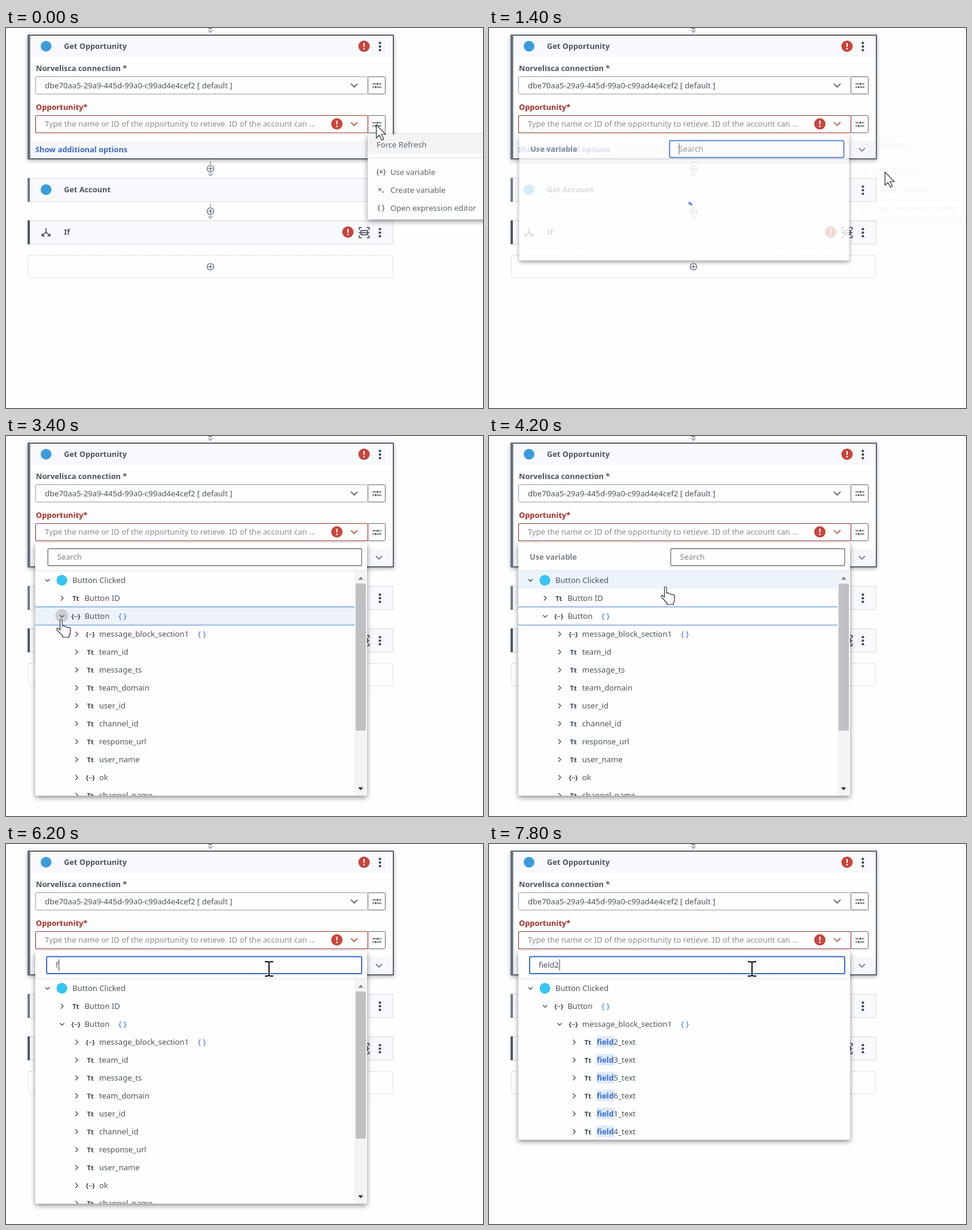
Animation of 798x636 px, one loop 8000 ms. Source, as an HTML page:

```html
<!DOCTYPE html>
<html lang="en">
<head>
<meta charset="utf-8">
<title>Workflow variable picker</title>
<style>
html, body { margin: 0; width: 100%; height: 100%; overflow: hidden; background: #fefefe; }
svg { display: block; width: 798px; height: 636px; font: 13.05px "Noto Sans", "Open Sans", sans-serif; white-space: pre; }
.card { filter: drop-shadow(0 2px 3px rgba(40, 50, 60, .4)); }
.float { filter: drop-shadow(0 3px 4px rgba(0, 0, 0, .45)); }
</style>
</head>
<body>
<svg id="stage" viewBox="0 0 798 636"></svg>
<script>
const INK = '#4a555f', DARK = '#36424c', RED = '#c8453d', BLUE = '#3a6cd4';
const LOOP = 8000, STEP = 200;
const stage = document.getElementById('stage');
const pen = document.createElement('canvas').getContext('2d');

// y is the visual centre of the line
const text = (x, y, s, fill = INK, extra = '') =>
  `<text x="${x}" y="${y + 4.6}" fill="${fill}" ${extra}>${s}</text>`;
const bold = (x, y, s, fill = INK) => text(x, y, s, fill, 'font-weight="600" font-size="12.8"');
const glyph = (x, y, s, size = 11, weight = 600) =>
  text(x, y - .5, s, DARK, `text-anchor="middle" font-weight="${weight}" font-size="${size}"`);
const rect = (x, y, w, h, fill, extra = '') =>
  `<rect x="${x}" y="${y}" width="${w}" height="${h}" fill="${fill}" ${extra}/>`;
const box = (x, y, w, h, stroke, width = 1) =>
  rect(x, y, w, h, '#fefefe', `rx="2" stroke="${stroke}" stroke-width="${width}"`);
const circle = (x, y, r, fill, extra = '') =>
  `<circle cx="${x}" cy="${y}" r="${r}" fill="${fill}" ${extra}/>`;
const line = (d, stroke = INK, width = 1.5) =>
  `<path d="${d}" fill="none" stroke="${stroke}" stroke-width="${width}"/>`;
const group = (body, extra) => `<g ${extra}>${body}</g>`;

const error = (x, y) => circle(x, y, 9.5, RED) +
  line(`M${x} ${y - 5.5}v6.5M${x} ${y + 3}v2.4`, '#fff', 2.2);
const kebab = y => [-6, 0, 6].map(d => circle(625.5, y + d, 2.1, DARK)).join('');
const down = (x, y, r = 5.5, stroke = INK, w = 1.7) =>
  line(`M${x - r} ${y - r / 2}l${r} ${r}l${r} ${-r}`, stroke, w);
const plus = y => circle(342, y, 5.5, 'none', `stroke="${INK}" stroke-width="1.2"`) +
  line(`M338.5 ${y}h7M342 ${y - 3.5}v7`, INK, 1.2);
const connector = y => line(`M342 ${y - 13}v7M342 ${y + 6}v5M338 ${y + 8}l4 4l4 -4`, '#9aa2a8', 1.3) + plus(y);
const settings = y => box(605.5, y - 14.5, 29, 29, '#5d6871') +
  line(`M613 ${y - 2.5}h6M624 ${y - 2.5}h4M613 ${y + 3}h3M621 ${y + 3}h7`, INK, 1.3) +
  circle(621.5, y - 2.5, 1.7, INK) + circle(618.5, y + 3, 1.7, INK);
const step = (y, name, bar) => rect(36.5, y + .5, 611, 39, '#f8f9fc', 'stroke="#d9dce1"') +
  rect(36, y, 4, 40, bar) + bold(97, y + 19.5, name);

const backdrop =
  connector(-4.5) + connector(235.5) + connector(306.5) +
  group(rect(37, 12, 611, 207, '#fefefe', 'stroke="#5a6670" stroke-width="2"'), 'class="card"') +
  rect(40, 13, 607, 36, '#f8f9fc') + rect(40, 188, 607, 30, '#f6f7fc') + rect(36, 11, 4.5, 209, '#65707a') +
  circle(67, 30.5, 9, '#3b9ddd') + bold(97, 30.5, 'Get Opportunity') + error(599, 30.5) + kebab(31) +
  bold(50, 67.5, 'Norvelisca connection *') +
  box(49.5, 81.5, 556, 29, '#98a0a7') + settings(96) + down(582.5, 96) +
  text(65, 96.5, 'dbe70aa5-29a9-445d-99a0-c99ad4e4cef2 [ default ]') +
  bold(50, 132.5, 'Opportunity*', '#a52c26') +
  settings(161) + box(49.5, 146.5, 556, 29, '#a13a34', 1.2) +
  text(65, 160.5, 'Type the name or ID of the opportunity to retieve. ID of the account can ...', '#858c92') +
  error(553.5, 160.5) + down(582.5, 160.5, 5.5, RED) +
  bold(49, 203.5, 'Show additional options', '#3c68c8') + down(624, 203.5, 5, INK, 1.3) +
  step(251, 'Get Account', '#727d86') + circle(67, 270.5, 9, '#3b9ddd') + kebab(271.5) +
  step(322, 'If', '#505b64') +
  line('M67 335v6.5l-6 6M67 341.5l6 6M60.5 344v4h4M73.5 344v4h-4', DARK, 1.6) + error(572, 341.5) + kebab(342.5) +
  line('M591 338v-4h4M603 334h4.5v4M607.5 347v4h-4M595 351h-4v-4M594 339h11v7h-11zM590 342.5h18', DARK, 1.5) +
  rect(37.5, 380.5, 609, 38, 'none', 'rx="3" stroke="#cfd3d7" stroke-dasharray="3 2"') + plus(399.5);

const menu =
  group(rect(605, 178, 200, 142.5, '#fefefe'), 'class="float"') +
  rect(605, 179, 193, 32, '#f2f4f5') + rect(605, 217, 193, 1, '#d8dbde') +
  text(620, 195.5, 'Force Refresh', '#59646d') +
  [['{×}', 'Use variable'], ['×₊', 'Create variable'], ['{ }', 'Open expression editor']]
    .map(([icon, label], i) => glyph(627.5, 241 + 30 * i, icon, 12, 400) + text(643, 241.5 + 30 * i, label, '#59646d')).join('');

// Tree rows: [level, icon, label, open]
const OBJ = '{··}', STR = 'Tt';
const root = [0, '', 'Button Clicked', true];
const closedRows = [root, [1, STR, 'Button ID'], [1, OBJ, 'Button']];
const openRows = [root, closedRows[1], [1, OBJ, 'Button', true], [2, OBJ, 'message_block_section1'],
  ...'team_id message_ts team_domain user_id channel_id response_url user_name'.split(' ').map(s => [2, STR, s]),
  [2, OBJ, 'ok'], [2, STR, 'channel_name']];
const foundRows = [root, [1, OBJ, 'Button', true], [2, OBJ, 'message_block_section1', true],
  ...[2, 3, 5, 6, 1, 4].map(n => [3, STR, `field${n}_text`])];

function treeRow([level, icon, label, open], i) {
  const y = 241.5 + 30 * i, x = 69.5 + 24.3 * level;
  const tag = /^(Button|message_block_section1)$/.test(label) ? `<tspan dx="15" fill="${BLUE}">{ }</tspan>` : '';
  const hit = level == 3;
  return (open ? down(x, y, 3.6, INK, 1.4) : line(`M${x - 2} ${y - 4}l4 4l-4 4`, INK, 1.4)) +
    (icon ? glyph(x + 23, y, icon) : circle(93.5, y, 9, '#36c5f0')) +
    (hit ? rect(180, y - 10, 29.5, 19, '#dce9fb') : '') +
    text(level ? 107 + 24.4 * level : 111, y,
      (hit ? `<tspan font-weight="600" font-size="12.8" fill="${BLUE}">field</tspan>${label.slice(5)}` : label) + tag);
}

const scrollbar = rect(583, 226, 20, 376, '#f3f4f6') + rect(585, 247, 17, 246, '#c0c0c4') +
  '<path d="M589 240.5h9l-4.5 -5z" fill="#888"/><path d="M589 588h8.5l-4.2 5z" fill="#333"/>';

// Piecewise linear keys: [time, value, value...]
function at(keys, t) {
  const i = keys.findIndex(k => k[0] > t);
  if (i < 0) return keys[keys.length - 1].slice(1);
  if (!i) return keys[0].slice(1);
  const a = keys[i - 1], b = keys[i], p = (t - a[0]) / (b[0] - a[0]);
  return a.slice(1).map((v, j) => v + (b[j + 1] - v) * p);
}
const pointerPath = [[0, 619, 162], [800, 662, 241], [1400, 662, 241], [2200, 130, 316], [2600, 119, 307],
  [3000, 92, 307], [3400, 92, 307], [3800, 150, 295], [4600, 440, 209]];
const searchOpen = [[1400, 0], [1600, .57], [1800, 1], [3400, 1], [3600, .43], [3800, 0], [4800, 0], [5000, .57], [5200, 1]];

function search(t) {
  const [open] = at(searchOpen, t);
  const focused = t < 3200 || t >= 4800;
  const left = 302 - 234 * open + (focused ? 0 : 2);
  const typed = t >= 7800 ? 'field2' : 'field'.slice(0, Math.max(0, (t - 6000) / STEP));
  pen.font = getComputedStyle(stage).font;
  const caret = left + 15.5 + pen.measureText(typed).width;
  const blink = t >= 5600 && t < 6000;
  return group(bold(68, 202.5, 'Use variable', '#78828a'), `opacity="${1 - open}"`) +
    box(left, 188.5, 595 - left, 28.5, focused ? BLUE : '#66717a', focused ? 2 : 1.3) +
    text(left + (typed ? 15 : 15.5), 202.5, typed || 'Search', typed ? INK : '#7c848b') +
    (focused && !blink ? rect(caret, 193, 1, 19, DARK) : '');
}

function panel(t, x, y) {
  const shown = Math.min(1, (t - 1200) / 250);
  const expanded = t >= 3200, found = t >= 7400;
  const rows = found ? foundRows : expanded ? openRows : closedRows;
  const bottom = found ? 495 : expanded ? 602 : 390;
  const right = expanded && !found ? 583 : 604;
  let list = '';
  if (t < 1800) {
    list = circle(326.5, 308, 17, 'none', `stroke="${BLUE}" stroke-width="3.5" pathLength="360" ` +
      `stroke-dasharray="${t < 1600 ? 24 : 150} 360" transform="rotate(-64 326.5 308)"`);
  } else {
    const hover = Math.floor((y - 226) / 30);
    if (hover >= 0 && hover < rows.length && x < right) list += rect(49, 226 + 30 * hover, right - 49, 30, '#edf3fb');
    if (expanded && t < 4800) {
      list += line(`M49 286H${right}M49 316.5H${right}`, '#7ea4e2');
      if (t < 3600) list += circle(93.5, 301, 11, '#cbced3');
    }
    list += rows.map(treeRow).join('');
    if (right == 583) list += scrollbar;
  }
  const body = group(rect(49, 179, 555, bottom - 179, '#fefefe', 'rx="2"'), 'class="float"') +
    search(t) + rect(49, 225, 555, 1, '#dde0e4') +
    `<clipPath id="view"><rect x="49" y="226" width="555" height="${bottom - 226}"/></clipPath>` +
    group(list, 'clip-path="url(#view)"');
  const scale = .975 + .025 * shown;
  return group(body, `opacity="${shown}" transform="translate(326.5 180) scale(${scale}) translate(-326.5 -180)"`);
}

const cursors = {
  arrow: 'M0.5 0V22l5 -4.5l4 8l3.5 -1.8l-4 -7.700h7z',
  hand: 'M-1.5 2q0 -2 1.7 -2t1.8 2v9q3 -2 4 1q3 -1 4 1.5q5 -1 5.5 2.5v5q0 4 -2 6v3h-11v-3' +
    'l-9 -9q-1.5 -3.5 1.5 -3.5l3.5 3z',
  beam: 'M-7 -12h5l2 1.5l2 -1.5h5M0 -10.5v21M-7 12h5l2 -1.5l2 1.5h5'
};
function cursor(t, x, y) {
  const onMenu = t < 1400 && y > 180;
  const onRows = t > 1400 && x < 604 && y > 226;
  const onSearch = t > 1400 && y <= 226;
  const body = onSearch ? line(cursors.beam, '#fff', 4) + line(cursors.beam, '#111', 2)
    : `<path d="${onMenu || onRows ? cursors.hand : cursors.arrow}" fill="#fff" stroke="#222" stroke-width="1.1"/>`;
  return group(body, `transform="translate(${x} ${y})"`);
}

function scene(t) {
  const [x, y] = at(pointerPath, t);
  const menuAlpha = Math.max(0, Math.min(1, 1 - (t - 1200) / 212));
  return backdrop + (t >= 1200 ? panel(t, x, y) : '') +
    (menuAlpha ? group(menu, `opacity="${menuAlpha}"`) : '') + cursor(t, x, y);
}

let last = -1;
const start = performance.now();
function tick(now) {
  const t = Math.floor(Math.max(0, now - start) % LOOP / STEP) * STEP;
  if (t !== last) stage.innerHTML = scene(last = t);
  requestAnimationFrame(tick);
}
tick(start);
</script>
</body>
</html>
```
